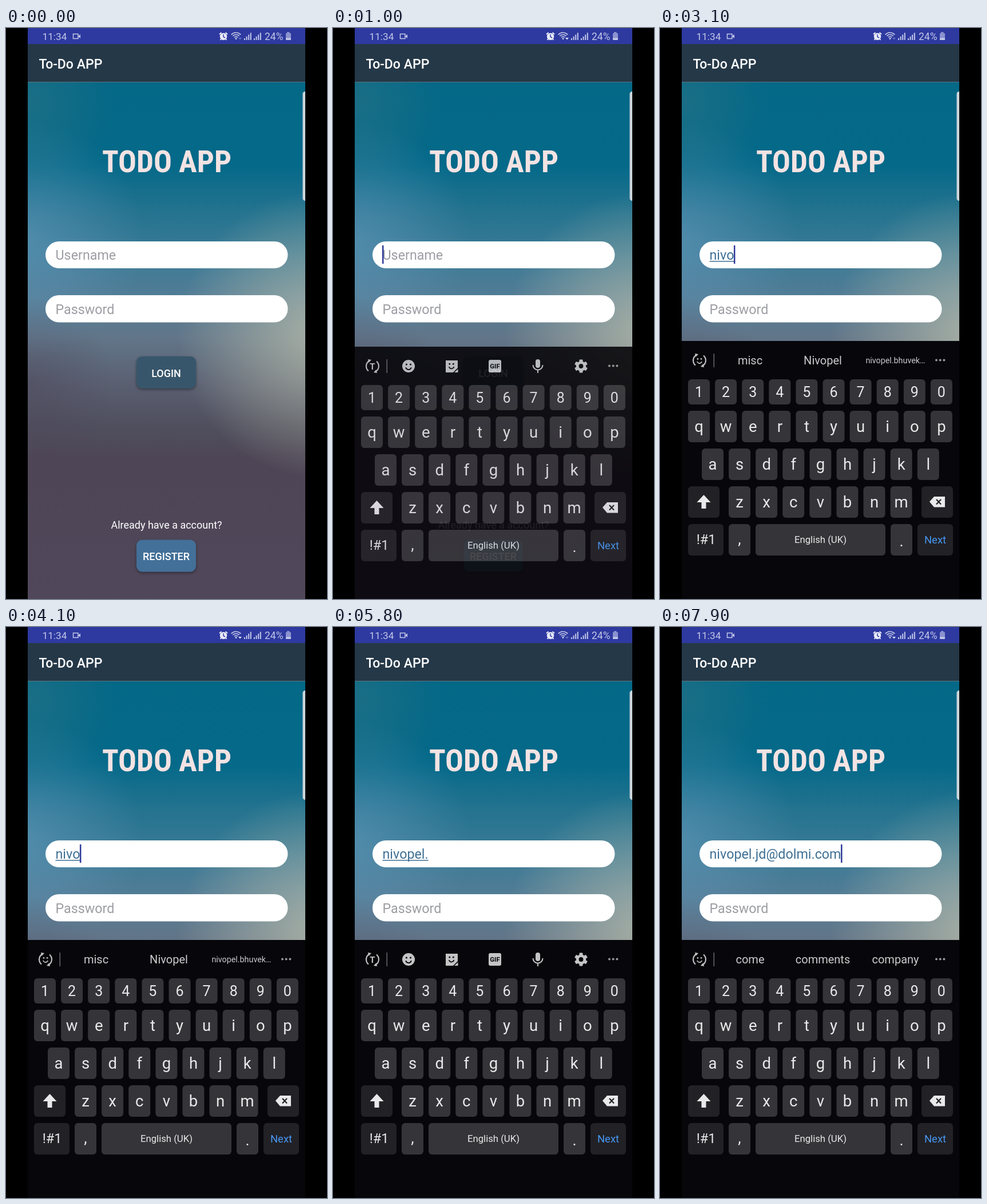
Animation, 561 px wide and 998 px high, one loop 8 s. Source, as an HTML page with a canvas:

```html
<!DOCTYPE html>
<html lang="en">
<head>
<meta charset="utf-8">
<title>To-Do APP</title>
<style>
html, body { margin: 0; width: 100%; height: 100%; overflow: hidden; background: #000; }
canvas { display: block; width: 561px; height: 998px; }
</style>
</head>
<body>
<canvas id="stage" width="561" height="998"></canvas>
<script>
const W = 561, H = 998, LEFT = 38, RIGHT = 523, LOOP = 8000, KB_TOP = 547;
const FONT = 'Roboto, "Noto Sans", sans-serif';
const NAME = 'Nivopel', USER = 'nivopel', MAIL = 'nivopel.jd@dolmi.com';

const newLayer = () => {
  const c = document.createElement('canvas');
  c.width = W; c.height = H;
  return c;
};
const stage = document.getElementById('stage').getContext('2d');
const page = newLayer(), keys = newLayer();
let g = stage;

// ---- drawing helpers ----
function box(x, y, w, h, r, fill) {
  g.beginPath();
  g.roundRect(x, y, w, h, r);
  g.fillStyle = fill;
  g.fill();
}
function disc(x, y, r, fill) {
  g.beginPath();
  g.arc(x, y, r, 0, Math.PI * 2);
  g.fillStyle = fill;
  g.fill();
}
function shape(pts, fill) {
  g.beginPath();
  for (let i = 0; i < pts.length; i += 2) g.lineTo(pts[i], pts[i + 1]);
  g.closePath();
  g.fillStyle = fill;
  g.fill();
}
function stroke(color, width, draw) {
  g.strokeStyle = color;
  g.lineWidth = width;
  g.beginPath();
  draw();
  g.stroke();
}
function text(s, x, y, size, color, align = 'left', weight = 400) {
  g.font = `${weight} ${size}px ${FONT}`;
  g.textAlign = align;
  g.fillStyle = color;
  g.fillText(s, x, y);
}
function glow(x, y, r, rgb, a) {
  const grad = g.createRadialGradient(x, y, 0, x, y, r);
  grad.addColorStop(0, `rgba(${rgb},${a})`);
  grad.addColorStop(0.5, `rgba(${rgb},${a * 0.5})`);
  grad.addColorStop(1, `rgba(${rgb},0)`);
  g.fillStyle = grad;
  g.fillRect(LEFT, 95, RIGHT - LEFT, H - 95);
}

// ---- login page ----
function backdrop() {
  const grad = g.createLinearGradient(0, 95, 0, H);
  const stops = [[95, '#046887'], [240, '#056989'], [320, '#24738f'], [400, '#3c7b96'],
    [470, '#527c95'], [540, '#627689'], [620, '#5a6072'], [690, '#50505f'], [750, '#4e4656'], [998, '#50475a']];
  for (const [y, c] of stops) grad.addColorStop((y - 95) / (H - 95), c);
  g.fillStyle = grad;
  g.fillRect(LEFT, 95, RIGHT - LEFT, H - 95);
  glow(30, 370, 210, '105,155,190', 0.55);
  glow(40, 130, 150, '60,120,130', 0.4);
  glow(550, 535, 250, '185,190,172', 0.8);
  glow(40, 620, 150, '75,65,85', 0.4);
}
function title() {
  g.save();
  g.fontStretch = 'condensed';
  g.textAlign = 'center';
  g.fillStyle = '#f3e3e3';
  g.font = `700 53px "Roboto Condensed", ${FONT}`;
  if (g.measureText('TODO APP').width > 232) {
    g.font = `700 49px ${FONT}`;
    g.letterSpacing = '-2px';
  }
  g.fillText('TODO APP', 281, 252);
  g.restore();
}
function button(label, y, fill) {
  g.save();
  g.shadowColor = 'rgba(0,0,0,.4)';
  g.shadowBlur = 5;
  g.shadowOffsetY = 2;
  box(228, y, 104, 56, 10, fill);
  g.restore();
  text(label, 280, y + 35.5, 18, '#fff', 'center', 500);
}
function statusBar() {
  const c = '#c3c8e8';
  box(LEFT, 0, RIGHT - LEFT, 28, 0, '#2e3aa0');
  text('11:34', 63.5, 21, 17.2, c);
  stroke(c, 1.5, () => g.rect(117.5, 10.5, 8.5, 8));
  shape([126, 14.5, 130, 11, 130, 18], c);
  // alarm clock
  disc(380, 15, 6.2, '#e8eaf8');
  stroke('#e8eaf8', 2, () => {
    g.moveTo(373, 11); g.lineTo(376.5, 8);
    g.moveTo(387, 11); g.lineTo(383.5, 8);
    g.moveTo(376, 19); g.lineTo(374.5, 21);
    g.moveTo(384, 19); g.lineTo(385.5, 21);
  });
  stroke('#2e3aa0', 1.4, () => { g.moveTo(380, 11); g.lineTo(380, 15.5); g.lineTo(383, 17); });
  // wifi
  for (const r of [4, 7.5, 11])
    stroke(c, 1.7, () => g.arc(402, 19, r, -Math.PI * 0.77, -Math.PI * 0.23));
  disc(402, 18.5, 1.6, c);
  // signal bars
  for (const x of [416, 433])
    for (let i = 0; i < 4; i++) box(x + i * 3.6, 18 - i * 3.2, 2, 3 + i * 3.2, 0, c);
  text('24%', 452, 21, 17.5, c);
  box(491, 7, 4.5, 2, 0, '#8a92cf');
  box(489, 9, 9, 12, 1, '#8a92cf');
  box(489, 17.5, 9, 3.5, 1, c);
}
function drawPage() {
  backdrop();
  statusBar();
  box(LEFT, 28, RIGHT - LEFT, 67, 0, '#253848');
  box(LEFT, 94, RIGHT - LEFT, 1, 0, '#56757f');
  text('To-Do APP', 57.5, 70.5, 23, '#fff', 'left', 500);
  box(518.5, 111, 4.5, 191, [5, 0, 0, 5], '#ccd6dc');
  title();
  box(69, 373, 423.5, 47, 23.5, '#fff');
  box(69, 467, 423.5, 47.5, 23.5, '#fff');
  text('Password', 86.5, 499.5, 23.3, '#9d9ea3');
  button('LOGIN', 574, '#38566b');
  text('Already have a account?', 280.5, 874.5, 18, '#fff', 'center');
  button('REGISTER', 894.5, '#437098');
}

// ---- keyboard ----
const INK = '#e9e9eb', ICON = '#c4c4c6', KEY = '#353438', SIDE = '#222125', KB = '#07060a', HELD = '#5c5967';
const ROWS = [['1234567890', 68, 614, 44], ['qwertyuiop', 68, 669, 55],
  ['asdfghjkl', 92, 735, 55], ['zxcvbnm', 139, 801, 55]];

function letters(held) {
  let at = null;
  ROWS.forEach(([row, x0, y, h], r) => [...row].forEach((ch, i) => {
    const x = x0 + i * 47.1, on = ch === held;
    if (on) at = [x, y];
    box(x - 19, y, 38, h, 6, on ? HELD : KEY);
    text(ch, x, r ? y + 37 : y + 31, r ? 27.5 : 25, INK, 'center');
  }));
  return at;
}
function controls() {
  box(49, 801, 55, 55, 6, SIDE);
  shape([76.5, 816, 88.5, 829, 80.5, 829, 80.5, 840, 72.5, 840, 72.5, 829, 64.5, 829], INK);
  box(457, 801, 55, 55, 6, SIDE);
  shape([471, 828, 479, 819, 498, 819, 498, 837.5, 479, 837.5], INK);
  stroke(SIDE, 2.2, () => {
    g.moveTo(483, 824); g.lineTo(491, 832.5);
    g.moveTo(491, 824); g.lineTo(483, 832.5);
  });
  box(49, 867, 62, 55, 6, SIDE);
  text('!#1', 80.5, 902, 23.5, INK, 'center');
  box(120, 867, 38, 55, 6, KEY);
  text(',', 139, 902, 27, INK, 'center');
  box(167, 867, 227, 55, 6, KEY);
  text('English (UK)', 280.5, 900, 16.7, INK, 'center');
  box(403, 867, 38, 55, 6, KEY);
  text('.', 422, 906, 27, INK, 'center');
  box(450, 867, 62, 55, 6, SIDE);
  text('Next', 481, 901, 18.5, '#4697f2', 'center');
}
function smile(x, y, s, ink) {
  disc(x - 3.6 * s, y - 3 * s, 1.6 * s, ink);
  disc(x + 3.6 * s, y - 3 * s, 1.6 * s, ink);
  stroke(ink, 2 * s, () => g.arc(x, y + s, 5 * s, 0.25, Math.PI - 0.25));
}
function switcher(icons) {
  stroke(ICON, 2, () => {
    g.arc(69, 581, 11, Math.PI * 0.72, Math.PI * 1.32);
    g.moveTo(69 + 11 * Math.cos(-0.28 * Math.PI), 581 + 11 * Math.sin(-0.28 * Math.PI));
    g.arc(69, 581, 11, -Math.PI * 0.28, Math.PI * 0.32);
  });
  shape([61, 569, 67, 570, 62.5, 575], ICON);
  shape([77, 593, 71, 592, 75.5, 587], ICON);
  if (icons) text('T', 69, 586.5, 15, ICON, 'center', 700);
  else smile(69, 581, 0.85, ICON);
  box(93.5, 569, 1.5, 24, 0, '#6b6a6e');
  for (const x of [483, 489.7, 496.4]) disc(x, 580.5, 2, '#99989c');
}
function iconBar() {
  disc(132, 581, 11, ICON);
  smile(132, 581, 1, KB);
  shape([197, 571, 218, 571, 218, 584, 210, 592, 197, 592], ICON);
  shape([218.5, 586, 218.5, 592, 212, 592], ICON);
  smile(207, 580, 0.9, KB);
  box(272, 570, 22, 22, 3, ICON);
  text('GIF', 283, 585.3, 11.5, KB, 'center', 700);
  // microphone
  box(354, 569, 8, 15, 4, ICON);
  stroke(ICON, 2, () => {
    g.arc(358, 579, 8.5, 0, Math.PI);
    g.moveTo(358, 587.5); g.lineTo(358, 593);
  });
  // gear
  disc(433.5, 581, 8.7, ICON);
  for (let i = 0; i < 6; i++) {
    g.save();
    g.translate(433.5, 581);
    g.rotate(i * Math.PI / 3);
    box(-3, -11.5, 6, 6, 1, ICON);
    g.restore();
  }
  disc(433.5, 581, 3.9, KB);
}
function drawKeyboard(state) {
  g.clearRect(0, 0, W, H);
  box(LEFT, KB_TOP, RIGHT - LEFT, H - KB_TOP, 0, KB);
  switcher(!state.words);
  if (!state.words) iconBar();
  else state.words.forEach((w, i) => {
    const small = w.length > 10;
    text(w, 157.5 + i * 127, small ? 586 : 588, small ? 14.3 : 20, '#cbcbce', 'center');
  });
  const at = letters(state.held);
  controls();
  if (at) {
    const [x, y] = at;
    box(Math.max(LEFT + 2, x - 32.5), y - 97, 65, 82, 11, '#1e1d21');
    text(state.held, x, y - 39, 44, '#fff', 'center');
  }
}

// ---- script of the typing ----
const first = ['misc', NAME, USER + '.bhuvek…'];
const second = ['….jd@dolmi.com', NAME, USER];
const EVENTS = [
  [0, { typed: '', held: '', words: null }],
  [1500, { held: 'n' }],
  [1600, { typed: 'n', held: '' }],
  [1700, { held: 'i' }],
  [1800, { typed: 'ni', held: 'v' }],
  [1900, { typed: 'niv', held: '', words: first }],
  [2000, { held: 'o' }],
  [2100, { typed: 'nivo' }],
  [2200, { held: '' }],
  [4400, { held: 'p' }],
  [4500, { typed: 'nivop', held: 'e' }],
  [4600, { typed: 'nivope', held: 'l' }],
  [4700, { typed: USER, held: '' }],
  [5300, { typed: USER + '.' }],
  [5400, { words: null }],
  [6100, { held: 'j' }],
  [6300, { typed: USER + '.j', held: '', words: second }],
  [6400, { held: 'd' }],
  [6500, { typed: USER + '.jd', held: '' }],
  [7500, { typed: MAIL, words: [] }],
  [7800, { words: ['come', 'comments', 'company'] }]
];
function stateAt(t) {
  const s = { since: 600 };
  for (const [at, change] of EVENTS) {
    if (at > t) break;
    Object.assign(s, change);
    if (change.typed) s.since = at;
  }
  return s;
}

function drawField(s, t) {
  const x = 86.5;
  text(s.typed || 'Username', x, 405, 23.3, s.typed ? '#3d6f94' : '#9d9ea3');
  const w = s.typed ? g.measureText(s.typed).width : 0;
  if (w && s.typed !== MAIL) box(x, 407, w, 1.5, 0, '#3d6f94');
  // the caret blinks every half second, starting over at each keystroke
  if (t >= 600 && Math.floor((t - s.since) / 500) % 2 === 0) box(x - 0.5 + w, 380, 2.5, 32, 0, '#2c3a98');
}
function drawTraffic(t) {
  const busy = (t >= 700 && t < 1500) || (t >= 3800 && t < 5800) || t >= 7800;
  const c = busy ? '#dfe3f8' : '#6670bd';
  shape([406, 17, 412, 17, 409, 20.5], c);
}

let last = -1;
function frame(now) {
  const t = Math.floor((now % LOOP) / 100) * 100;
  if (t !== last) {
    last = t;
    const s = stateAt(t);
    g = stage;
    g.fillStyle = '#000';
    g.fillRect(0, 0, W, H);
    g.drawImage(page, 0, 0);
    drawTraffic(t);
    drawField(s, t);
    const p = Math.min(1, Math.max(0, (t - 600) / 500));
    if (p > 0) {
      g = keys.getContext('2d');
      drawKeyboard(s);
      g = stage;
      g.globalAlpha = Math.min(1, p * 1.12);
      g.drawImage(keys, 0, Math.round(244 * (1 - p) ** 2));
      g.globalAlpha = 1;
    }
  }
  requestAnimationFrame(frame);
}

g = page.getContext('2d');
drawPage();
const start = performance.now();
const tick = now => frame(Math.max(0, now - start));
const raf = window.requestAnimationFrame.bind(window);
window.requestAnimationFrame = () => raf(tick);
tick(start);
</script>
</body>
</html>
```
